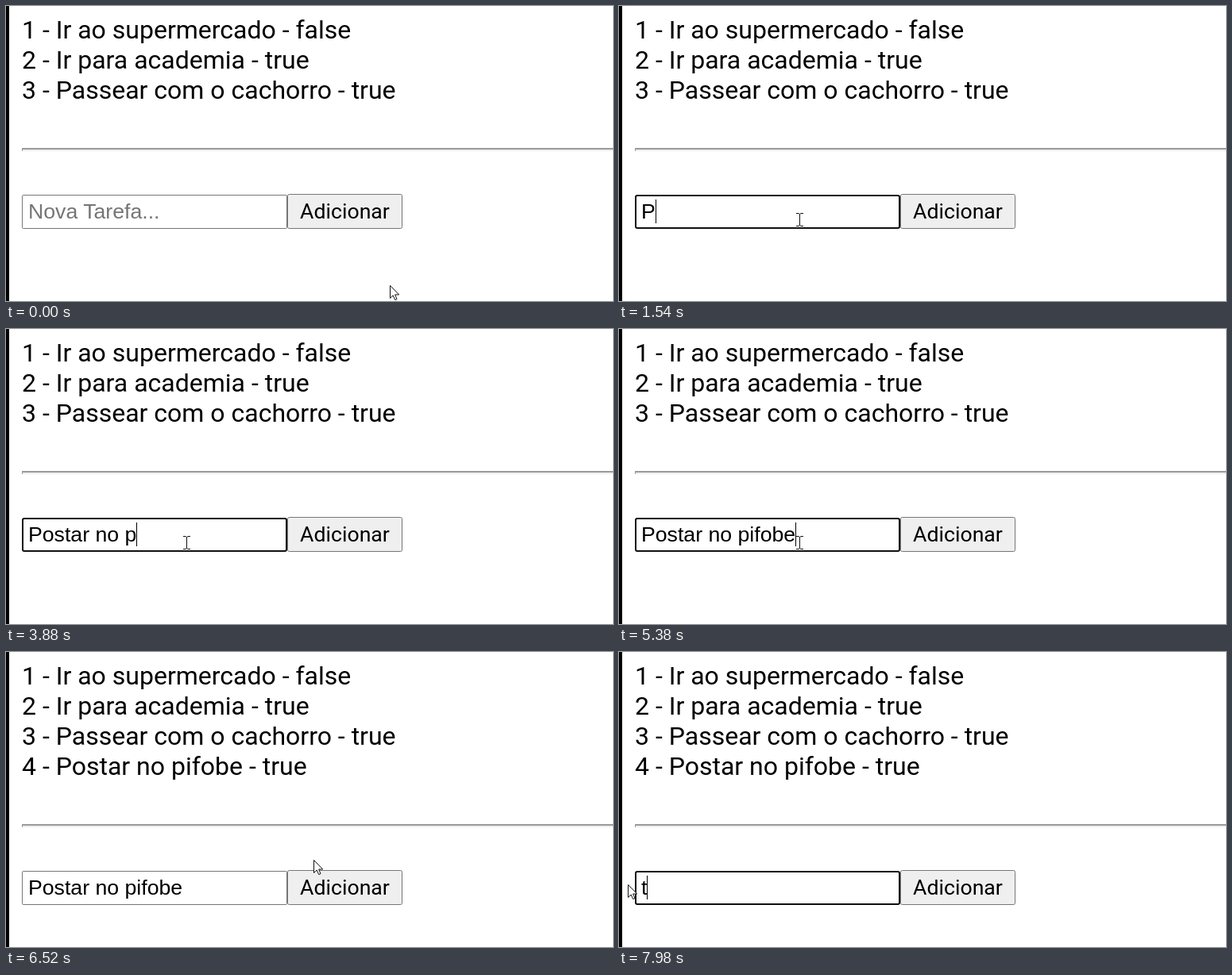
Animation of 764x372 px, one loop 8000 ms. Source, as an HTML page:

```html
<!DOCTYPE html>
<html lang="pt">
<head>
<meta charset="utf-8">
<title>Tarefas</title>
<style>
  html, body { margin: 0; width: 100%; height: 100%; overflow: hidden; background: #fff; }
  svg { display: block; width: 764px; height: 372px; }
  text { white-space: pre; }
  .list { font: 32px Roboto, sans-serif; }
  .field { font: 26.667px "Liberation Sans", Arial, sans-serif; }
  .label { font: 26.667px Roboto, sans-serif; text-anchor: middle; }
</style>
</head>
<body>
<svg viewBox="0 0 764 372">
  <rect width="4" height="372"/>
  <g class="list">
    <text x="20" y="41">1 - Ir ao supermercado - false</text>
    <text x="20" y="79">2 - Ir para academia - true</text>
    <text x="20" y="117">3 - Passear com o cachorro - true</text>
    <text x="20" y="155" id="added">4 - Postar no pifobe - true</text>
  </g>
  <g id="form">
    <rect x="20" y="181" width="744" height="2" fill="#eee"/>
    <path d="M20 179H764V181H21V183H20Z" fill="#9a9a9a"/>
    <rect id="blurred" x="20.5" y="238.5" width="333" height="42" rx="1" fill="#fff" stroke="#767676"/>
    <rect id="focused" x="21" y="239" width="332" height="41" rx="2" fill="#fff" stroke="#101010" stroke-width="2"/>
    <rect id="mark" y="244" height="30" fill="#3390ff"/>
    <text class="field" x="28" y="268"><tspan id="plain"></tspan><tspan id="picked" fill="#fff"></tspan></text>
    <path id="wave" fill="none" stroke="#e02020" stroke-width="1.5"/>
    <rect id="caret" y="244" width="1" height="30"/>
    <rect id="button" x="354.5" y="237.5" width="144" height="43" rx="2" stroke="#767676"/>
    <text class="label" x="426.5" y="268">Adicionar</text>
  </g>
  <g id="mouse">
    <circle id="press" r="11" fill="#f5e63c" opacity=".8"/>
    <path id="beam" d="M-4 -7.5H-1L.5 -6.5L2 -7.5H5M.5 -6.5V7.5M-4 8.5H-1L.5 7.5L2 8.5H5" fill="none" stroke="#111"/>
    <path id="arrow" d="M.5 .5V16.5L4.2 13L6.7 18.6L9 17.6L6.6 12H11.7Z" fill="#fff" stroke="#111"/>
  </g>
</svg>
<script>
const LOOP = 8000, LEFT = 28, SHIFT = 38;
const TASK = 'Postar no pifobe';
const KEYS = [1540, 1850, 2080, 2250, 2400, 2480, 2940, 3260,
              3510, 3730, 3880, 4200, 4520, 4900, 5130, 5380];
const FOCUS = 580, CLICK = 6370, ADD = 6440, DRAG = 6920, RELEASE = 7830, RETYPE = 7900;

// time, x, y of the pointer
const PATH = [
  [0, 483, 352], [580, 227, 269], [5780, 227, 269], [6220, 387, 262],
  [6560, 387, 262], [6920, 228, 292], [7220, 121, 291], [7680, 12, 293],
  [7905, 11, 293]
];
// the pointer is redrawn in steps: start, end, count
const STEPS = [[70, 700, 9], [5830, 6220, 6], [6370, 7140, 11], [7220, 7680, 7], [7830, 7980, 3]];

const el = {};
document.querySelectorAll('[id]').forEach(n => el[n.id] = n);
const show = (n, on) => n.setAttribute('visibility', on ? 'visible' : 'hidden');
const between = (t, a, b) => t >= a && t < b;

const pen = document.createElement('canvas').getContext('2d');
function edge(s) {
  pen.font = '26.667px "Liberation Sans", Arial, sans-serif';
  return LEFT + pen.measureText(s).width;
}

function snap(t) {
  let last = 0;
  for (const [a, b, n] of STEPS) {
    if (t < a) break;
    const step = (b - a) / (n - 1);
    last = Math.min(b, a + Math.floor((t - a) / step) * step);
  }
  return last;
}

function pointer(t) {
  const i = PATH.findIndex(k => k[0] > t);
  if (i < 0) return PATH[PATH.length - 1].slice(1);
  const [a, x, y] = PATH[i - 1], [b, p, q] = PATH[i];
  let u = (t - a) / (b - a);
  if (a < DRAG) u = u * u * (3 - 2 * u);
  return [x + (p - x) * u, y + (q - y) * u];
}

// index of the first selected letter for a drag that reaches x
function dragStart(x) {
  let i = TASK.length;
  while (i > 0 && (edge(TASK.slice(0, i - 1)) + edge(TASK.slice(0, i))) / 2 > x) i--;
  return i;
}

function waveLine() {
  let x = edge('Postar no '), d = `M${x} 272`;
  for (let up = true; x < edge(TASK) - 3; up = !up) d += `L${x += 3} ${up ? 270 : 272.5}`;
  return d;
}

function draw(t) {
  const [x, y] = pointer(snap(t));
  const drop = t >= ADD ? SHIFT : 0;
  const focus = between(t, FOCUS, CLICK) || t >= DRAG;
  const drag = between(t, DRAG, RELEASE);
  const typed = KEYS.filter(k => k <= t).length;
  const text = t >= RETYPE ? 't' : TASK.slice(0, typed);
  const from = between(t, DRAG, RETYPE) ? dragStart(x) : text.length;
  const empty = text === '';

  show(el.added, drop > 0);
  el.form.setAttribute('transform', `translate(0 ${drop})`);
  show(el.blurred, !focus);
  show(el.focused, focus);

  el.plain.textContent = empty ? 'Nova Tarefa...' : text.slice(0, from);
  el.plain.setAttribute('fill', empty ? '#757575' : '#000');
  el.picked.textContent = text.slice(from);
  const start = edge(text.slice(0, from)), end = edge(text);
  el.mark.setAttribute('x', Math.round(start));
  el.mark.setAttribute('width', Math.max(0, Math.round(end) - Math.round(start)));
  el.wave.setAttribute('d', waveLine());
  show(el.wave, between(t, DRAG, RETYPE));

  const reset = t >= RETYPE ? RETYPE : t >= DRAG ? DRAG : typed ? KEYS[typed - 1] : FOCUS;
  const lit = Math.floor((t - reset) / 500) % 2 === 0;
  el.caret.setAttribute('x', Math.round(end));
  show(el.caret, focus && lit && from === text.length);

  const inside = y > 238 + drop && y < 281 + drop;
  const hover = inside && x >= 354 && x < 499;
  const down = between(t, CLICK, ADD);
  el.button.setAttribute('fill', down ? '#f5f5f5' : hover ? '#e5e5e5' : '#efefef');

  const beam = drag || (inside && x >= 20 && x < 354);
  el.mouse.setAttribute('transform', `translate(${Math.round(x)} ${Math.round(y)})`);
  show(el.beam, beam);
  show(el.arrow, !beam);
  el.press.setAttribute('cx', drag ? -2 : 0);
  show(el.press, drag || down || between(t, FOCUS, 700));
}

const origin = performance.now();
function tick() {
  draw((performance.now() - origin) % LOOP);
  requestAnimationFrame(tick);
}
tick();
</script>
</body>
</html>
```
